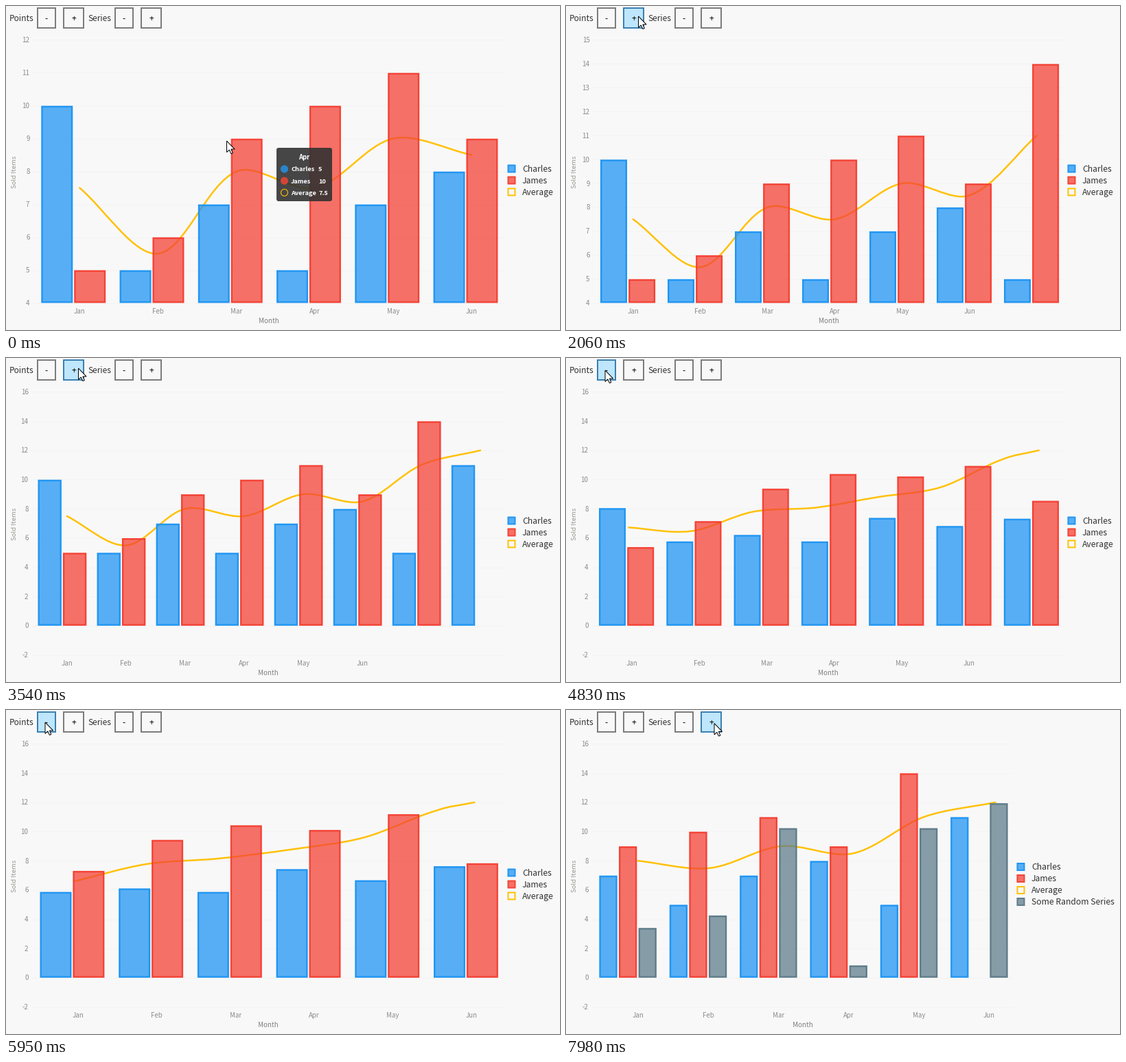
These frames come from a looping animation (807x473 px, 8 s). A matplotlib script:

```python
import numpy as np
import matplotlib.pyplot as plt
from matplotlib.animation import FuncAnimation
from matplotlib.patches import Circle, FancyBboxPatch, PathPatch, Polygon, Rectangle
from matplotlib.path import Path
from matplotlib.colors import to_rgba

W, H, DPI = 807, 473, 100
PT = 72 / DPI
STEP, LOOP = 40, 8000
MORPH = 740
TOP, BOTTOM = 49.5, 433.5

BG = "#f8f8f8"
BLUE, RED, YELLOW, SLATE = "#2196f3", "#f44336", "#ffc107", "#607d8b"
MONTHS = ["Jan", "Feb", "Mar", "Apr", "May", "Jun"]

plt.rcParams["font.family"] = ["Noto Sans CJK JP", "DejaVu Sans"]

CHARLES = [10, 5, 7, 5, 7, 8, 5, 11]
JAMES = [5, 6, 9, 10, 11, 9, 14, 0]
AVERAGE = [7.5, 5.5, 8, 7.5, 9, 8.5, 11, 12]
RANDOM = [4, 5, 12, 1, 12, 14]


class Layout:
    """Chart geometry for one window of the data."""

    def __init__(self, start, first, n, x0, step, width, shift, label, axis,
                 tick_x=32.5, month_x=381, right=725, extra=None):
        self.start, self.n = start, n
        self.x0, self.step, self.width, self.shift = x0, step, width, shift
        self.label, self.axis = label, axis
        self.tick_x, self.month_x, self.right = tick_x, month_x, right
        self.extra = extra is not None
        self.base = self.y(max(0, axis[0]))
        rows = [CHARLES[first:first + n], JAMES[first:first + n]]
        if self.extra:
            rows.append(extra)
        self.tops = [[self.y(v) for v in row] for row in rows]
        ys = [self.y(v) for v in AVERAGE[first:first + n]]
        self.curve = smooth([(label + i * step, y) for i, y in enumerate(ys)])

    def y(self, v):
        lo, hi, _ = self.axis
        return BOTTOM - (v - lo) / (hi - lo) * (BOTTOM - TOP)


def smooth(points, s=0.65):
    """Bezier points of a smooth line: start, then c1, c2, end per segment."""
    p = np.array(points, float)
    p = np.vstack([p[:1], p, p[-1:]])
    out = [p[1]]
    for a, b, c, d in zip(p, p[1:], p[2:], p[3:]):
        l1, l2, l3 = (np.hypot(*(v - u)) for u, v in ((a, b), (b, c), (c, d)))
        m1, m2, m3 = (a + b) / 2, (b + c) / 2, (c + d) / 2
        k1 = m1 + (m2 - m1) * l1 / (l1 + l2)
        k2 = m2 + (m3 - m2) * l2 / (l2 + l3)
        out += [b + (m2 - k1) * s, c + (m2 - k2) * s, c]
    return np.array(out)


WIDE = (-2, 16, 2)
LAYOUTS = [
    Layout(-MORPH, 0, 6, 51.3, 114.25, 46, 47.9, 107.2, (4, 12, 1), 34.5, 382),
    Layout(1370, 0, 7, 50, 98, 39, 41.1, 97.7, (4, 15, 1), 34.5, 382),
    Layout(2800, 0, 8, 46.5, 86.05, 34.4, 36.4, 88.7, WIDE),
    Layout(4718, 1, 7, 48, 98.3, 39, 41.2, 95.6, WIDE),
    Layout(5820, 2, 6, 49.5, 114.7, 46, 47.9, 104.7, WIDE),
    Layout(7640, 2, 6, 48.4, 102.35, 26.3, 28.6, 104.7, WIDE,
           month_x=344, right=651, extra=RANDOM),
]

BUTTONS = [(45, 73, "-"), (83, 114, "+"), (158, 186, "-"), (196, 227, "+")]
PRESSES = [(950, 1230), (2440, 2640), (4350, 4580), (5610, 5760), (7310, 7490)]
# cursor keys: time, x, y
CURSOR = np.array([
    (60, 321.5, 197), (380, 205, 96), (710, 105.5, 15),
    (3650, 105.5, 15), (4080, 57, 18), (6300, 57, 18),
    (6560, 165, 18), (6940, 216, 19.5)])
ARROW = np.array([(0, 0), (0, 16.5), (3.8, 13), (6.4, 18.6),
                  (8.8, 17.6), (6.4, 12), (11.6, 12)])

fig = plt.figure(figsize=(W / DPI, H / DPI), dpi=DPI, facecolor=BG)
ax = fig.add_axes([0, 0, 1, 1])
ax.set_xlim(0, W)
ax.set_ylim(H, 0)
ax.axis("off")
live = []


def text(x, y, s, size, color, ha="left", z=5, **kw):
    """Text whose capitals are centred on y, size in pixels."""
    return ax.text(x, y + 0.365 * size, s, fontsize=size * PT, color=color,
                   ha=ha, va="baseline", zorder=z, **kw)


def box(x0, y0, x1, y1, stroke, fill, lw, z):
    """Rectangle given by the outer edge of its stroke."""
    h = lw / 2
    r = Rectangle((x0 + h, y0 + h), x1 - x0 - lw, y1 - y0 - lw, fc=fill,
                  ec=stroke, lw=lw * PT, zorder=z, joinstyle="miter")
    r.set_snap(False)
    return ax.add_patch(r)


def translucent(color):
    return to_rgba(color, 0.75)


def draw_axes(lay):
    lo, hi, inc = lay.axis
    for v in range(lo, hi + 1, inc):
        y = lay.y(v)
        live.extend(ax.plot([38, lay.right], [y, y], color="#f3f3f3",
                            lw=PT, zorder=1))
        live.append(text(lay.tick_x, y, str(v), 9.8, "#8c8c8c", "right"))
    for i, name in enumerate(MONTHS):
        x = lay.label + i * lay.step
        live.append(text(x, 445, name, 9.7, "#8c8c8c", "center"))
    live.append(text(lay.month_x + 0.5, 459, "Month", 9.9, "#808080", "center"))


def draw_line(old, new, p):
    a, b = old.curve, new.curve
    if len(a) < len(b):
        rise = b[len(a):].copy()
        rise[:, 1] = old.base
        a = np.vstack([a, rise])
    elif len(a) > len(b):
        b = np.vstack([b, np.repeat(b[-1:], len(a) - len(b), axis=0)])
    pts = a + (b - a) * p
    codes = [Path.MOVETO] + [Path.CURVE4] * (len(pts) - 1)
    live.append(ax.add_patch(PathPatch(
        Path(pts, codes), fc="none", ec=YELLOW, lw=2.5 * PT, zorder=2,
        capstyle="round")))


def draw_bars(old, new, p):
    base = old.base + (new.base - old.base) * p
    for s, (tops, color) in enumerate(zip(new.tops, (BLUE, RED, SLATE))):
        for i, top in enumerate(tops):
            known = s < len(old.tops) and i < old.n
            start = old.tops[s][i] if known else old.base
            y = start + (top - start) * p
            if base - y < 2.5:
                continue
            x = new.x0 + i * new.step + s * new.shift
            live.append(box(x, y + 0.2, x + new.width, base, color,
                            translucent(color), 2.4, 3))


def draw_legend(lay):
    items = [("Charles", BLUE), ("James", RED), ("Average", YELLOW)]
    x, y = 730.5, 237.5
    if lay.extra:
        items.append(("Some Random Series", SLATE))
        x, y = 656.5, 229
    for i, (name, color) in enumerate(items):
        cy = y + 17 * i
        fill = "none" if color == YELLOW else translucent(color)
        live.append(box(x, cy - 6, x + 12, cy + 6, color, fill, 2, 5))
        live.append(text(x + 21.5, cy, name, 12.2, "#333333"))


def draw_tooltip(cx, cy, title, values):
    x, y = cx - 40.5, cy - 39
    live.append(ax.add_patch(FancyBboxPatch(
        (x + 3, y + 3), 75, 72, boxstyle="round,pad=3,rounding_size=3",
        fc=(0.196, 0.196, 0.196, 0.9), ec="none", zorder=7)))
    live.append(text(cx, y + 13.5, title, 9.4, "white", "center", 9,
                     weight="bold"))
    rows = zip(("Charles", "James", "Average"), values,
               ("#2a85cc", "#d04638", "none"))
    for i, (name, value, color) in enumerate(rows):
        ry = y + 31 + 17.2 * i
        edge = YELLOW if color == "none" else color
        live.append(ax.add_patch(Circle((x + 11.5, ry), 5, fc=color, ec=edge,
                                        lw=1.1 * PT, zorder=8)))
        for tx, s in ((x + 21, name), (x + 61, value)):
            live.append(text(tx, ry, s, 9.2, "white", z=9, weight="bold"))


text(5, 18, "Points", 12, "#333333")
text(119, 18, "Series", 12, "#333333")
ax.text(12.5, 242.5, "Sold Items", fontsize=9.6 * PT, color="#9a9690",
        rotation=90, ha="center", va="center", zorder=5)
frames_of_buttons = [box(x0, 2, x1, 33, "#7c7c7c", BG, 2, 4)
                     for x0, x1, _ in BUTTONS]
for x0, x1, sign in BUTTONS:
    text((x0 + x1) / 2, 18, sign, 12, "black", "center")
pointer = ax.add_patch(Polygon(ARROW, closed=True, fc="white", ec="black",
                               lw=PT, zorder=20))


def draw_controls(t):
    x, y = (np.interp(t, CURSOR[:, 0], CURSOR[:, k]) for k in (1, 2))
    pointer.set_xy(ARROW + (x, y))
    pressed = any(a <= t < b for a, b in PRESSES)
    for (x0, x1, _), b in zip(BUTTONS, frames_of_buttons):
        fill, edge = BG, "#7c7c7c"
        if x0 <= x <= x1 and 2 <= y <= 33:
            fill, edge = (("#c4e5f6", "#2c628b") if pressed
                          else ("#bee6fd", "#3c7fb1"))
        b.set_facecolor(fill)
        b.set_edgecolor(edge)


def update(k):
    while live:
        live.pop().remove()
    t = (k + 1) * STEP - 10
    i = max(j for j, lay in enumerate(LAYOUTS) if lay.start <= t)
    new, old = LAYOUTS[i], LAYOUTS[max(i - 1, 0)]
    p = 1 - (1 - min(1, (t - new.start) / MORPH)) ** 3
    draw_axes(new)
    draw_line(old, new, p)
    draw_bars(old, new, p)
    draw_legend(new)
    if t <= 60:
        draw_tooltip(434.5, 246, "Apr", ("5", "10", "7.5"))
    elif t < 340:
        draw_tooltip(320, 222, "Mar", ("7", "9", "8"))
    draw_controls(t)
    return live


anim = FuncAnimation(fig, update, frames=LOOP // STEP, interval=STEP,
                     init_func=lambda: [], repeat=True, repeat_delay=0,
                     cache_frame_data=False)
plt.show()
```
